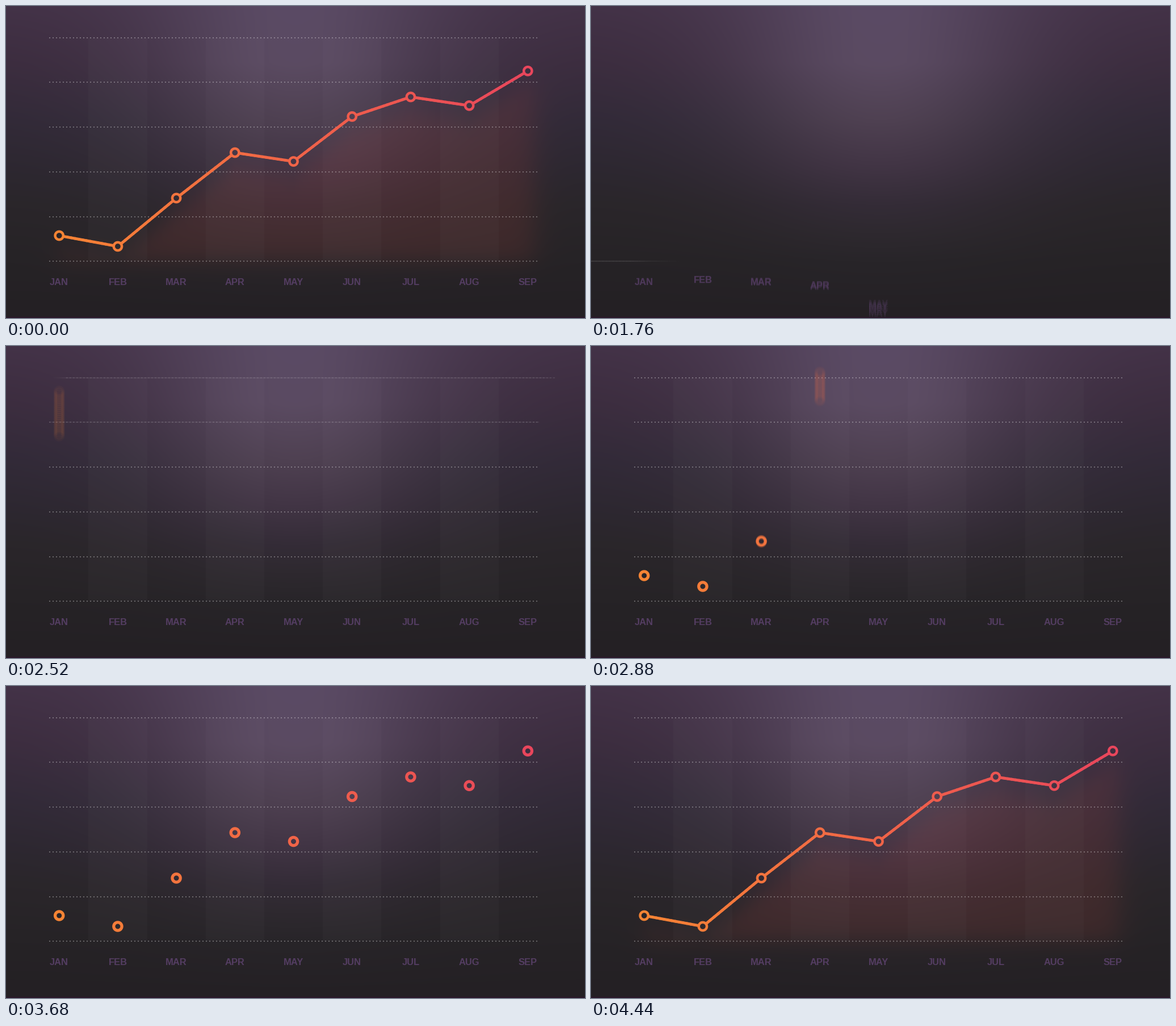
These frames come from a looping animation (1020 px wide and 549 px high, 7440 ms). A matplotlib script:

```python
import numpy as np
import matplotlib.pyplot as plt
from matplotlib.animation import FuncAnimation
from matplotlib.collections import LineCollection
from matplotlib.patches import Rectangle

W, H, DPI = 1020, 549, 64  # a power of two keeps the pixel size exact
STEP, LOOP = 40, 7440
MONTHS = "JAN FEB MAR APR MAY JUN JUL AUG SEP".split()
XS = 93.7 + 103.2 * np.arange(9)
YS = np.array([404, 423, 338, 258, 273.5, 194.5, 160, 175.3, 114.3])
GRID_YS = np.round(55.8 + 78.7 * np.arange(6)).astype(int)
SHUTTER = 10  # half of the exposure, ms

# (phase in ms, value) for each kind of entrance
LABEL_MOVE = ([-40, 0, 40, 80, 120, 160, 200, 240, 280, 320],
              [90, 45, 18, 6, 3, 0, -3, -4, -2, 0])
GRID_MOVE = ([-40, 0, 40, 80, 120, 160, 200, 240, 280, 320],
             [-1150, -960, -835, -600, -330, -60, 29, 40, 15, 0])
RING_MOVE = ([-40, -10, 10, 30, 40, 50, 80, 120, 160],
             [0, .235, .42, .91, 1.03, 1.04, 1.04, 1.015, 1])


def ramp(values, stops, colors):
    """Piecewise linear colour ramp."""
    return np.stack([np.interp(values, stops, c) for c in zip(*colors)], -1)


def smooth(p):
    p = np.clip(p, 0, 1)
    return p * p * (3 - 2 * p)


def sigmoid(v):
    return 1 / (1 + np.exp(-np.clip(v, -40, 40)))


def exposure(move, phase, count):
    """Values of a move over the open shutter; a single one when at rest."""
    values = np.interp(phase + np.linspace(-SHUTTER, SHUTTER, count), *move)
    return values if np.ptp(values) > 1e-6 else values[:1]


def heat(x):
    return ramp(x, XS[[0, 4, 8]],
                [(246, 132, 52), (240, 100, 72), (233, 70, 92)]) / 255


px, py = np.arange(W) + .5, np.arange(H) + .5


def make_backdrop():
    side = ramp(py, [0, 100, 200, 300, 350, 450, 549],
                [(67, 50, 71), (60, 45, 63), (50, 42, 56), (44, 39, 47),
                 (42, 38, 42), (38, 35, 38), (36, 32, 36)])
    middle = ramp(py, [0, 100, 200, 280, 350, 400, 450, 549],
                  [(91, 75, 101), (91, 75, 98), (79, 65, 82), (66, 53, 69),
                   (52, 44, 55), (46, 41, 47), (40, 37, 41), (36, 32, 36)])
    glow = np.exp(-((px - 510) / 255) ** 2)[None, :, None]
    image = side[:, None] + (middle - side)[:, None] * glow
    image[547:] = 42, 22, 42
    return image


def make_area():
    """Soft opacity of the warm area below the curve."""
    depth = py[:, None] - np.interp(px, XS, YS)[None]
    sides = sigmoid((px - 95) / 14) * sigmoid((930 - px) / 14)
    return .14 * sigmoid((depth - 25) / 13) * sigmoid((449 - py[:, None]) / 11) * sides


def make_curve():
    """Short pieces of the curve, leaving the ring holes open."""
    pieces, ends, start = [], [], 0
    for i in range(8):
        a, b = np.array([XS[i], YS[i]]), np.array([XS[i + 1], YS[i + 1]])
        length = np.hypot(*(b - a))
        s = np.linspace(8, length - 8, 14)
        pts = a + (b - a) * (s / length)[:, None]
        pieces += list(np.stack([pts[:-1], pts[1:]], 1))
        ends += list(start + s[1:])
        start += length
    return np.array(pieces), np.array(ends) / start


backdrop = make_backdrop()
tint = make_area()[..., None] * (np.array([200, 72, 62]) - backdrop)
pieces, piece_ends = make_curve()
piece_colors = heat(pieces[:, :, 0].mean(1))
node_at = np.r_[0, piece_ends[12::13]]

fig = plt.figure(figsize=(W / DPI, H / DPI), dpi=DPI)
ax = fig.add_axes([0, 0, 1, 1])
ax.axis("off")


def layer(data, box, z):
    return ax.imshow(data, extent=box, interpolation="nearest",
                     aspect="auto", zorder=z)


back = layer(backdrop.astype(np.uint8), (0, W, H, 0), 0)
bands = [ax.add_patch(Rectangle((x - 51.6, 449), 103.2, 0, fc="white",
                                ec="none", alpha=.02, zorder=1))
         for x in XS[1::2]]
grid = [layer(np.zeros((1, W, 4)), (0, W, y + 1, y - 1), 4) for y in GRID_YS]
curve = ax.add_collection(LineCollection([], linewidths=5 * 72 / DPI,
                                         capstyle="round", zorder=5))
lefts = np.floor(XS).astype(int) - 12
rings = [layer(np.zeros((H, 25, 4)), (x, x + 25, H, 0), 6) for x in lefts]
labels = [[ax.text(x, 491, name, family="Liberation Sans", weight="bold",
                   size=16.5 * 72 / DPI, color="#543d62", ha="center",
                   va="baseline", zorder=3, clip_on=True) for _ in range(7)]
          for x, name in zip(XS, MONTHS)]
ax.set_xlim(0, W)
ax.set_ylim(H, 0)


def draw_labels(t):
    for i, ghosts in enumerate(labels):
        offsets = exposure(LABEL_MOVE, t - 1440 - 80 * i, len(ghosts))
        for k, ghost in enumerate(ghosts):
            ghost.set_visible(k < len(offsets) and bool(offsets[k] < 75))
            if k < len(offsets):
                ghost.set_y(491 + offsets[k])
                ghost.set_alpha(1 if len(offsets) == 1 else .25)


def draw_grid(t):
    for i, image in enumerate(reversed(grid)):
        offsets = exposure(GRID_MOVE, t - 1720 - 120 * i, 48)
        u = px[None] - 76 - offsets[:, None]
        dots = (u >= 0) & (u < 861) & (u % 6 < 2)
        row = np.ones((1, W, 4))
        row[0, :, 3] = .3 * dots.mean(0)
        image.set_data(row)


def draw_rings(t, progress):
    for i, image in enumerate(rings):
        phase = t - 2520 - 120 * i
        image.set_visible(phase > -40)
        if phase <= -40:
            continue
        heights = -20 + (YS[i] + 20) * exposure(RING_MOVE, phase, 24)
        dx = lefts[i] + np.arange(25) + .5 - XS[i]
        dy = py[None, :, None] - heights[:, None, None]
        width = 4.5 if progress > 0 and progress >= node_at[i] else 5.3
        edge = width / 2 + .5 - np.abs(np.hypot(dx, dy) - 7.1)
        data = np.empty((H, 25, 4))
        data[..., :3] = heat(XS[i])
        data[..., 3] = np.clip(edge, 0, 1).mean(0)
        image.set_data(data)


def draw_curve(progress):
    shown = piece_ends <= progress + 1e-9
    curve.set_segments(pieces[shown])
    curve.set_color(piece_colors[shown])
    back.set_data((backdrop + tint * progress).astype(np.uint8))


def update(frame):
    t = frame * STEP
    if t < 1000:  # the finished chart holds over the loop point
        t += LOOP
    progress = smooth((t - 3920) / 520)
    grown = 393 * smooth((t - 1760) / 440)
    for band in bands:
        band.set_y(449 - grown)
        band.set_height(grown)
    draw_labels(t)
    draw_grid(t)
    draw_rings(t, progress)
    draw_curve(progress)
    return []


anim = FuncAnimation(fig, update, frames=LOOP // STEP, interval=STEP,
                     repeat=True, repeat_delay=0, blit=False)
plt.show()
```
